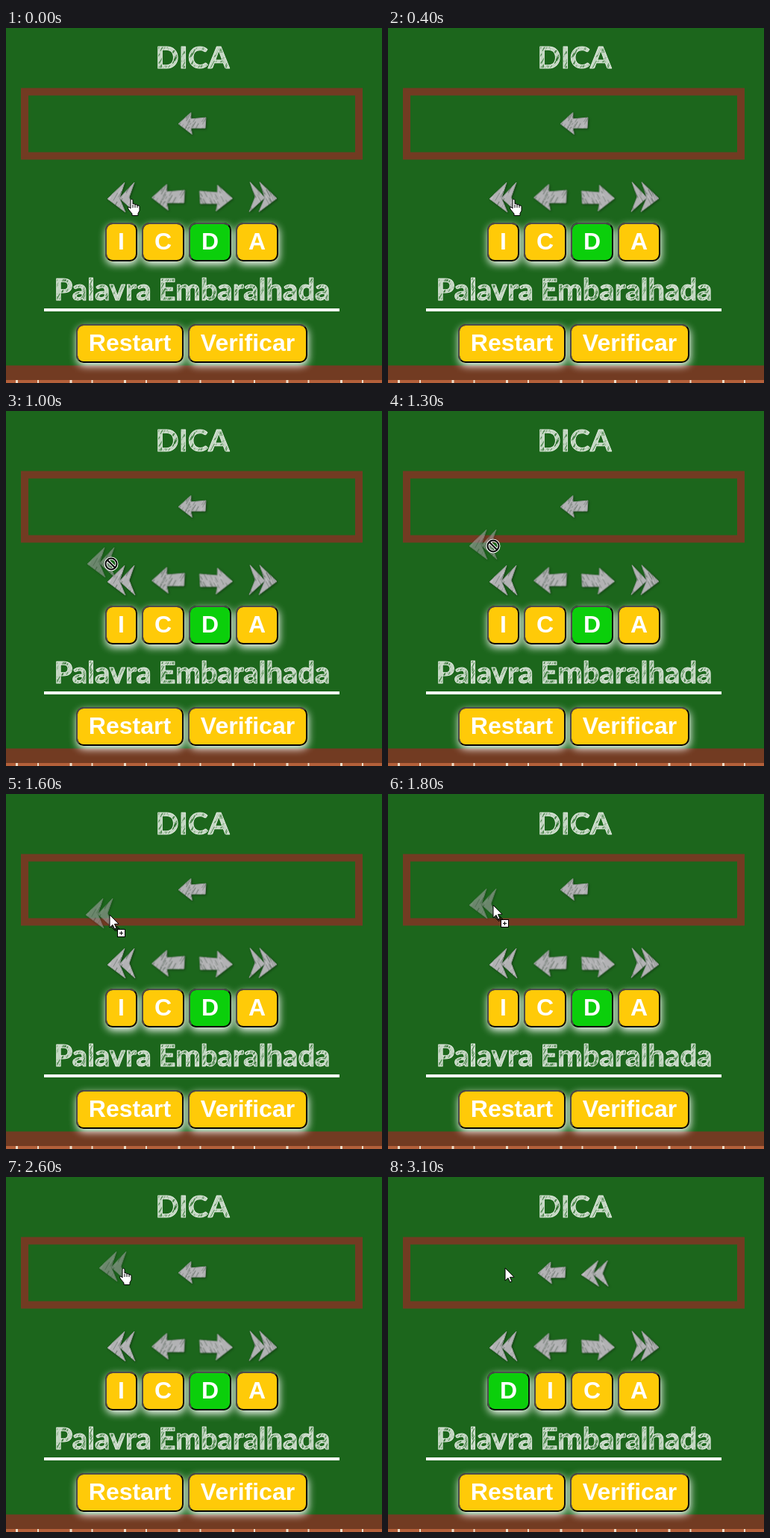
Recreate the animation shown at these times as an HTML page with a canvas. Size 504 px wide and 476 px high, loop 3.6 s.

```html
<!DOCTYPE html>
<html lang="pt">
<head>
<meta charset="utf-8">
<title>Palavra Embaralhada</title>
<style>
html, body { margin: 0; width: 100%; height: 100%; overflow: hidden; background: #1c661c; }
canvas { display: block; }
</style>
</head>
<body>
<canvas id="stage" width="504" height="476"></canvas>
<script>
const W = 504, H = 476, LOOP = 3600, STEP = 100;
const GREEN = '#1c661c', BROWN = '#723b22', GOLD = '#ffca08', LIME = '#0bcf0b';
const ctx = document.getElementById('stage').getContext('2d');

function layer(w, h) {
  const c = document.createElement('canvas');
  c.width = w;
  c.height = h;
  return c;
}

function random(seed) {
  return () => (seed = (seed * 16807) % 2147483647) / 2147483647;
}

function poly(g, pts) {
  g.beginPath();
  for (let i = 0; i < pts.length; i += 2) g.lineTo(pts[i], pts[i + 1]);
  g.closePath();
}

function line(g, x1, y1, x2, y2) {
  g.beginPath();
  g.moveTo(x1, y1);
  g.lineTo(x2, y2);
  g.stroke();
}

// Short slanted scratches over whatever is already painted
function scratch(g, w, h, count, seed, color) {
  const rnd = random(seed);
  g.globalCompositeOperation = 'source-atop';
  g.strokeStyle = color;
  for (let i = 0; i < count; i++) {
    const x = rnd() * w, y = rnd() * h, len = 3 + rnd() * 8;
    g.lineWidth = 0.5 + rnd() * 0.8;
    line(g, x, y, x + len * 0.55, y - len);
  }
  g.globalCompositeOperation = 'source-over';
}

function chalk(g, text, x, base, size, seed) {
  const c = layer(W, 64), p = c.getContext('2d');
  p.font = `bold ${size}px Lato, sans-serif`;
  p.textAlign = 'center';
  p.fillStyle = '#c3d5c2';
  p.fillText(text, x, 46);
  scratch(p, W, 64, 1500, seed, 'rgba(28,102,28,.75)');
  p.strokeStyle = '#e6eee4';
  p.lineWidth = 1;
  p.lineJoin = 'round';
  p.strokeText(text, x, 46);
  g.drawImage(c, 0, base - 46);
}

const PAD = 4;

function icon(shapes, seed, flip) {
  const c = layer(54, 54), p = c.getContext('2d');
  p.translate(PAD, PAD);
  if (flip) {
    p.translate(flip, 0);
    p.scale(-1, 1);
  }
  p.fillStyle = '#b2b2b4';
  p.strokeStyle = '#959a98';
  p.lineWidth = 1;
  for (const s of shapes) {
    poly(p, s);
    p.fill();
    p.stroke();
  }
  scratch(p, 48, 48, 45, seed, 'rgba(60,78,64,.5)');
  scratch(p, 48, 48, 24, seed + 9, 'rgba(205,205,208,.6)');
  return c;
}

const chevrons = [
  [0, 23, 23, 1, 16, 22, 24, 41],
  [16, 22, 36, 1, 29, 21, 37, 41]
];
const arrow = [[0, 19, 20, 1, 20, 11, 44, 9, 43, 26, 20, 26, 22, 36]];
const first = icon(chevrons, 41);
const last = icon(chevrons, 77, 37);
const prev = icon(arrow, 15);
const next = icon(arrow, 93, 44);

function put(g, img, x, y, sx = 1, sy = sx, alpha = 1) {
  g.save();
  g.globalAlpha = alpha;
  g.shadowColor = 'rgba(0,0,0,.4)';
  g.shadowBlur = 3;
  g.shadowOffsetX = g.shadowOffsetY = 1;
  g.translate(x, y);
  g.scale(sx, sy);
  g.drawImage(img, -PAD, -PAD);
  g.restore();
}

function button(g, text, x, y, w, h, fill = GOLD) {
  g.save();
  g.fillStyle = fill;
  g.shadowColor = '#fff';
  g.shadowBlur = 11;
  g.shadowOffsetX = 1;
  g.shadowOffsetY = 4;
  g.beginPath();
  g.roundRect(x, y, w, h, 10);
  g.fill();
  g.shadowColor = 'transparent';
  g.beginPath();
  g.roundRect(x + 1, y + 1, w - 2, h - 2, 9);
  g.lineWidth = 2;
  g.strokeStyle = '#000';
  g.stroke();
  // Lighter bevel on the top and left edges
  const edge = new Path2D();
  edge.roundRect(x + 1, y + 1, w - 2, h - 2, 9);
  poly(g, [x, y, x + w, y, x + w - 10, y + 10, x + 10, y + h - 10, x, y + h]);
  g.clip();
  g.strokeStyle = '#4c4c4c';
  g.stroke(edge);
  g.restore();
  g.font = 'bold 32px "Liberation Sans", Arial, sans-serif';
  g.textAlign = 'center';
  g.fillStyle = '#fff';
  g.fillText(text, x + w / 2, y + 36);
}

function tiles(g, word) {
  let x = 133;
  for (const ch of word) {
    const w = ch === 'I' ? 43 : 57;
    button(g, ch, x, 261, w, 52, ch === 'D' ? LIME : GOLD);
    x += w + 6;
  }
}

function board() {
  const c = layer(W, H), g = c.getContext('2d');
  g.fillStyle = GREEN;
  g.fillRect(0, 0, W, H);
  g.strokeStyle = BROWN;
  g.lineWidth = 10;
  g.strokeRect(25, 85.5, 448, 86);
  g.fillStyle = BROWN;
  g.fillRect(0, 452.5, W, 20);
  g.fillStyle = '#b4603a';
  g.fillRect(0, 472, W, 4);
  g.fillStyle = '#efdcc6';
  for (let x = 13; x < W; x += 72.5) {
    g.fillRect(x, 472, 3, 4);
    g.fillRect(x + 29, 472, 2, 4);
  }
  chalk(g, 'DICA', 250, 54, 41, 7);
  chalk(g, 'Palavra Embaralhada', 249.5, 365, 40, 21);
  g.fillStyle = '#fff';
  g.fillRect(51, 376, 396, 4);
  button(g, 'Restart', 94, 397, 144, 52);
  button(g, 'Verificar', 244, 397, 160, 52);
  put(g, first, 136, 206);
  put(g, prev, 195.5, 208.5);
  put(g, next, 259.5, 209.5);
  put(g, last, 326, 205.5);
  return c;
}

function pointer(x, y) {
  poly(ctx, [x, y, x, y + 17, x + 4, y + 13.4, x + 6.6, y + 19, x + 9, y + 18, x + 6.5, y + 12.4, x + 12, y + 12.2]);
  ctx.fillStyle = '#fff';
  ctx.strokeStyle = '#000';
  ctx.lineWidth = 1;
  ctx.fill();
  ctx.stroke();
}

function hand(x, y) {
  ctx.save();
  ctx.translate(x - 5, y);
  ctx.fillStyle = '#fff';
  ctx.strokeStyle = '#000';
  ctx.lineWidth = 1;
  ctx.lineJoin = 'round';
  poly(ctx, [4, 1.5, 5.5, 0.5, 7, 1.5, 7, 7, 9, 6.5, 10, 8, 12, 7.5, 13, 9, 15, 9, 16, 10.5,
    16, 16, 14, 19.5, 14, 22.5, 6, 22.5, 6, 20, 1, 14, 0.5, 11.5, 2, 11, 4, 13]);
  ctx.fill();
  ctx.stroke();
  for (const k of [7, 10, 13]) line(ctx, k, 8, k, 12);
  ctx.restore();
}

function noDrop(x, y) {
  for (const [color, w] of [['#fff', 4], ['#000', 2]]) {
    ctx.strokeStyle = color;
    ctx.lineWidth = w;
    ctx.beginPath();
    ctx.arc(x, y, 7.5, 0, Math.PI * 2);
    ctx.stroke();
    line(ctx, x - 5, y - 5, x + 5, y + 5);
  }
}

function copyDrop(x, y) {
  // Dotted trail between the pointer and the plus box
  ctx.strokeStyle = '#000';
  ctx.lineWidth = 1;
  ctx.setLineDash([1, 1]);
  for (let k = 0; k < 7; k++) line(ctx, x + 1 + k, y + 15.5 + k, x + 10 + k, y + 15.5 + k);
  ctx.setLineDash([]);
  pointer(x, y);
  ctx.fillStyle = '#fff';
  ctx.fillRect(x + 10, y + 19, 11, 11);
  ctx.strokeRect(x + 10.5, y + 19.5, 10, 10);
  line(ctx, x + 13, y + 24.5, x + 18, y + 24.5);
  line(ctx, x + 15.5, y + 22, x + 15.5, y + 27);
}

// Time, x, y of the mouse
const path = [
  [0, 168, 229], [400, 168, 229], [700, 155, 222], [1000, 141, 205], [1300, 141, 181],
  [1500, 138, 168], [1800, 141, 149], [2200, 154, 124], [2400, 157, 122], [LOOP, 157, 122]
];

function mouse(t) {
  const i = path.findIndex(p => p[0] > t);
  const [t0, x0, y0] = path[i - 1], [t1, x1, y1] = path[i];
  const k = (t - t0) / (t1 - t0);
  return [Math.round(x0 + (x1 - x0) * k), Math.round(y0 + (y1 - y0) * k)];
}

const back = board();

function draw(t) {
  const [x, y] = mouse(t);
  const dropped = t >= 2700, dragging = t >= 500 && !dropped;
  ctx.drawImage(back, 0, 0);
  tiles(ctx, dropped ? 'DICA' : 'ICDA');
  if (dropped) {
    put(ctx, prev, 201, 113, 0.84);
    put(ctx, first, 259, 111, 0.98, 0.87);
  } else {
    put(ctx, prev, 231, 112.5, 0.84);
  }
  if (dragging) put(ctx, first, x - 32, y - 23, 1, 1, 0.55);
  if (t >= 2800) pointer(x, y);
  else if (!dragging || t >= 2600) hand(x, y);
  else if (y > 177) noDrop(x, y);
  else copyDrop(x, y);
}

function tick() {
  const t = performance.now() % LOOP;
  draw(Math.floor(t / STEP) * STEP);
  requestAnimationFrame(tick);
}
tick();
</script>
</body>
</html>
```
